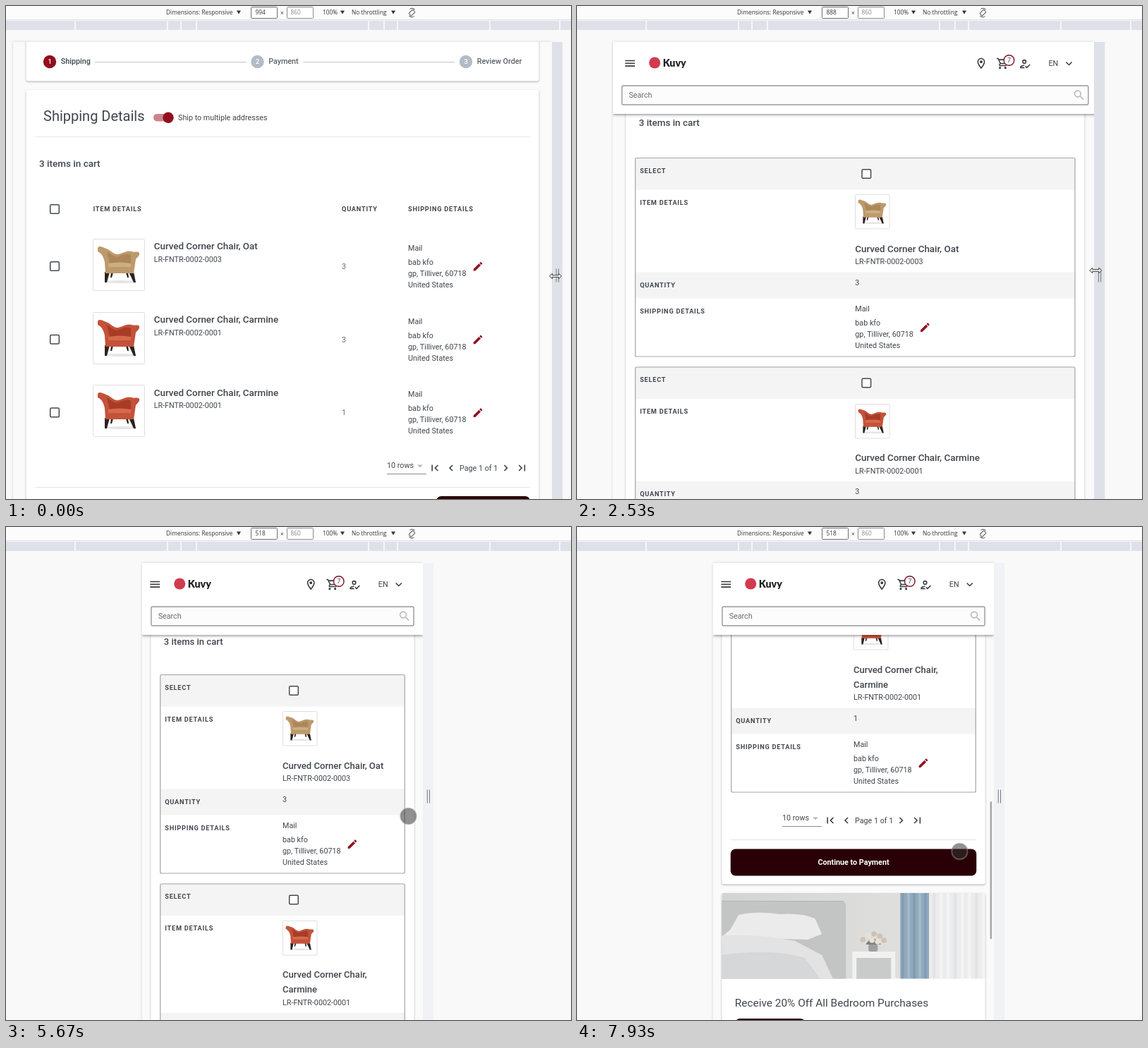
Recreate the animation shown at these times as an HTML page with a canvas. Size 801 by 699 pixels, loop 8000 ms.

```html
<!DOCTYPE html>
<html lang="en">
<head>
<meta charset="utf-8">
<title>Responsive checkout</title>
<style>
html, body { margin: 0; width: 100%; height: 100%; overflow: hidden; }
canvas { display: block; }
</style>
</head>
<body>
<canvas id="stage" width="801" height="699"></canvas>
<script>
const ctx = document.getElementById('stage').getContext('2d');
const LOOP = 8000, STEP = 1000 / 15, SCALE = 0.7686, CENTER = 392, TOP = 51, BOTTOM = 699;
const INK = '#40464d', RED = '#920f1f', DARK = '#290005';

// Timelines: flat lists of step, value
const WIDTH = [0, 994, 19, 994, 19.5, 991.4, 20, 991.4, 20.5, 986, 30, 933, 33, 933, 37.5, 894, 38, 888,
  38.5, 888, 46, 683, 46.5, 664, 47.5, 664, 53, 601, 54, 601, 59, 565, 67, 565, 67.5, 560, 68.5, 560,
  69, 554, 72, 554, 78, 518];
const SCROLL = [90, 0, 95, 100, 101, 231, 103, 262, 115, 690, 116, 690, 119, 750];
const CURSOR_DX = [0, 5, 1, 6, 19, 6, 20, 2, 47, 2, 68, 4.5];
const CURSOR_Y = [20, 383, 38, 375, 47, 368, 68, 362];
const TOUCH_X = [83, 580, 88, 556, 91, 540, 101, 540, 119, 542.5];
const TOUCH_Y = [83, 390, 88, 440, 91, 450, 101, 450, 119, 460];

const ICONS = {
  pencil: 'M3 17.25V21h3.75L17.81 9.94l-3.75-3.75zM20.71 7.04a1 1 0 0 0 0-1.41l-2.34-2.34a1 1 0 0 0-1.41 0l-1.83 1.83 3.75 3.75z',
  pin: 'M12 2C8.13 2 5 5.13 5 9c0 5.25 7 13 7 13s7-7.75 7-13c0-3.87-3.13-7-7-7zM7 9a5 5 0 0 1 10 0c0 2.88-2.88 7.19-5 9.88C9.92 16.21 7 11.85 7 9zM9.5 9a2.5 2.5 0 1 0 5 0a2.5 2.5 0 1 0-5 0z',
  cart: 'M15.55 13c.75 0 1.41-.41 1.75-1.03l3.58-6.49A1 1 0 0 0 20 4H5.21l-.94-2H1v2h2l3.6 7.59-1.35 2.44C4.52 15.37 5.48 17 7 17h12v-2H7l1.1-2zM6.16 6h12.15l-2.76 5H8.53zM5 20a2 2 0 1 0 4 0a2 2 0 1 0-4 0zM15 20a2 2 0 1 0 4 0a2 2 0 1 0-4 0z',
  user: 'M7 8a4 4 0 1 0 8 0a4 4 0 1 0-8 0zM9 8a2 2 0 1 1 4 0a2 2 0 1 1-4 0zM5 18c.2-.63 2.57-1.68 4.96-1.94l2.04-2C11.6 14 11.3 14 11 14c-2.67 0-8 1.34-8 4v2h9l-2-2zM20.6 12.5l-5.13 5.17-2.07-2.08L12 17l3.47 3.5L22 13.91z',
  search: 'M15.5 14h-.79l-.28-.27a6.5 6.5 0 1 0-.7.7l.27.28v.79l5 4.99L20.49 19zM9.5 14a4.5 4.5 0 1 1 0-9a4.5 4.5 0 0 1 0 9z',
  menu: 'M3 6h18v2H3zM3 11h18v2H3zM3 16h18v2H3z',
  down: 'M7.41 8.59L12 13.17l4.59-4.58L18 10l-6 6-6-6z',
  caret: 'M7 10h10l-5 5z',
  prev: 'M15.41 7.41L14 6l-6 6 6 6 1.41-1.41L10.83 12z',
  next: 'M8.59 16.59L10 18l6-6-6-6-1.41 1.41L13.17 12z',
  first: 'M18.41 16.59L13.82 12l4.59-4.59L17 6l-6 6 6 6zM6 6h2v12H6z',
  last: 'M5.59 7.41L10.18 12l-4.59 4.59L7 18l6-6-6-6zM16 6h2v12h-2z',
};
const CHAIR = {
  legs: 'M17 47h7l-4 15h-3zM51 47h7l3 15h-3zM26 48h3l-2 7h-2zM47 48h3l1 7h-2z',
  shell: 'M7 13C9 9 14 12 19 14C26 16 29 23 36 22C43 20 49 16 55 18C60 20 63 17 66 20C67 24 63 26 61 29L58 49H18L17 34C16 26 12 20 7 18z',
  back: 'M20 18C26 21 29 27 37 25C44 22 50 20 54 23L54 35H24z',
  seat: 'M22 35Q38 32 54 35V40H22z',
};
const TAN = ['#bd9a6b', '#ab875a', '#cdae82'], RUST = ['#c4523a', '#a83c26', '#d66a4a'];
const ITEMS = [
  { name: ['Curved Corner Chair,', 'Oat'], sku: 'LR-FNTR-0002-0003', qty: '3', tones: TAN },
  { name: ['Curved Corner Chair,', 'Carmine'], sku: 'LR-FNTR-0002-0001', qty: '3', tones: RUST },
  { name: ['Curved Corner Chair,', 'Carmine'], sku: 'LR-FNTR-0002-0001', qty: '1', tones: RUST },
];

function at(keys, k) {
  if (k <= keys[0]) return keys[1];
  for (let i = 2; i < keys.length; i += 2) {
    if (k <= keys[i]) {
      const f = (k - keys[i - 2]) / (keys[i] - keys[i - 2]);
      return keys[i - 1] + f * (keys[i + 1] - keys[i - 1]);
    }
  }
  return keys[keys.length - 1];
}

function rect(x, y, w, h, fill) {
  ctx.fillStyle = fill;
  ctx.fillRect(x, y, w, h);
}

function box(x, y, w, h, r, fill, stroke, line = 1) {
  ctx.beginPath();
  ctx.roundRect(x, y, w, h, r);
  if (fill) { ctx.fillStyle = fill; ctx.fill(); }
  if (stroke) { ctx.strokeStyle = stroke; ctx.lineWidth = line; ctx.stroke(); }
}

function circle(x, y, r, fill, stroke, line) {
  box(x - r, y - r, 2 * r, 2 * r, r, fill, stroke, line);
}

function shadowed(blur, dy, color, draw) {
  ctx.save();
  Object.assign(ctx, { shadowBlur: blur, shadowOffsetY: dy, shadowColor: color });
  draw();
  ctx.restore();
}

function paper(x, y, w, h) {
  shadowed(2.5, 1, 'rgba(0,0,0,.32)', () => box(x, y, w, h, 3, '#fff'));
}

// y is the middle of the capitals
function text(str, x, y, { size = 10.76, weight = 400, color = INK, gap = 0, align = 'left', font = 'Roboto' } = {}) {
  ctx.font = `${weight} ${size}px ${font}, sans-serif`;
  ctx.letterSpacing = gap + 'px';
  ctx.textAlign = align;
  ctx.fillStyle = color;
  ctx.fillText(str, x, Math.round(y + size * 0.355));
}

const label = (str, x, y) => text(str, x, y, { size: 9.22, weight: 700, gap: 0.75 });

function shape(path, x, y, scale, fill) {
  ctx.save();
  ctx.translate(x, y);
  ctx.scale(scale, scale);
  ctx.fillStyle = fill;
  ctx.fill(new Path2D(path), 'evenodd');
  ctx.restore();
}

function icon(name, x, y, color = '#363b40', scale = SCALE) {
  shape(ICONS[name], x - 12 * scale, y - 12 * scale, scale, color);
}

const checkbox = (x, y) => box(x - 6.3, y - 6.3, 12.6, 12.6, 1.5, '#fff', '#454a50', 1.5);

function thumbnail(x, y, size, [main, shade, light]) {
  box(x + 0.5, y + 0.5, size - 1, size - 1, 1, '#fff', '#dfdfdf');
  const s = size / 74;
  ctx.fillStyle = 'rgba(0,0,0,.1)';
  ctx.beginPath();
  ctx.ellipse(x + 40 * s, y + 61 * s, 23 * s, 2 * s, 0, 0, 7);
  ctx.fill();
  shape(CHAIR.legs, x, y, s, '#2c211d');
  shape(CHAIR.shell, x, y, s, main);
  shape(CHAIR.back, x, y, s, shade);
  shape(CHAIR.seat, x, y, s, light);
}

function address(x, y) {
  ['Mail', 'bab kfo', 'gp, Tilliver, 60718', 'United States'].forEach((line, i) =>
    text(line, x, y + [0, 20, 36, 52][i]));
  icon('pencil', x + 99, y + 26.3, RED, 0.7);
}

function pager(x, y) {
  text('10 rows', x, y);
  icon('caret', x + 47, y + 0.5, '#b5b5b5');
  rect(x, y + 11.5, 56, 1, '#8d8d8d');
  icon('first', x + 68, y + 3.5);
  icon('prev', x + 91, y + 3.5);
  text('Page 1 of 1', x + 103, y + 3.5);
  icon('next', x + 168.5, y + 3.5);
  icon('last', x + 191.5, y + 3.5);
}

function drawTools(viewWidth) {
  const ui = { size: 8.35, font: '"Open Sans"', color: '#333' };
  rect(0, 0, 801, 699, '#f9f9f9');
  rect(0, 0, 801, 20, '#fcfcfc');
  rect(0, 19, 801, 1, '#dcdcdc');
  text('Dimensions: Responsive', 227, 9.5, ui);
  text('100%', 449, 9.5, ui);
  text('No throttling', 490, 9.5, ui);
  for (const x of [330, 477, 549]) shape('M-3-2.5H3L0 2.5z', x, 9, 1, '#333');
  box(347.5, 1.5, 37, 16, 1, '#fff', '#6e6e6e');
  box(398.5, 1.5, 37, 16, 1, '#fff', '#8a8a8a');
  text(String(Math.round(viewWidth)), 353.5, 9.5, ui);
  text('×', 389, 10, ui);
  text('860', 403.5, 9.5, { ...ui, color: '#888' });
  ctx.save();
  ctx.translate(575.5, 9.5);
  ctx.rotate(Math.PI / 4);
  box(-2.5, -4, 5, 8, 1, null, '#555');
  for (const a of [-2.9, 0.25]) { ctx.beginPath(); ctx.arc(0, 0, 6, a, a + 1.3); ctx.stroke(); }
  ctx.restore();
  rect(0, 21, 801, 13, '#dee1e8');
  for (const d of [122, 144, 163, 294, 393]) {
    rect(CENTER - d - 0.7, 21, 1.4, 13, '#fff');
    rect(CENTER + d - 0.7, 21, 1.4, 13, '#fff');
  }
}

function drawWide(x, w) {
  const right = x + w, medium = { weight: 500 };
  paper(x + 18.5, 40, w - 37, 66.5);
  paper(x + 18.5, 119, w - 37, 620);
  [[x + 52, 'Shipping'], [CENTER - 35.5, 'Payment'], [right - 122, 'Review Order']].forEach(([cx, name], i) => {
    circle(cx, 79, 9.2, i ? '#b3bbc6' : RED);
    text(i + 1, cx, 79, { size: 9.2, weight: 500, color: '#fff', align: 'center' });
    text(name, cx + 15.7, 78.5, { ...medium, color: i ? '#5c636b' : INK });
  });
  rect(x + 116, 79, 341 - x - 116, 1, '#c3c7cc');
  rect(421, 79, right - 138 - 421, 1, '#c3c7cc');

  text('Shipping Details', x + 43, 156, { size: 20 });
  box(x + 199, 153, 26, 10.5, 5, '#cb858d');
  circle(x + 220, 158.2, 7.7, RED);
  text('Ship to multiple addresses', x + 234, 158.5);
  rect(x + 31, 185, w - 62, 1, '#e8e8e8');
  text('3 items in cart', x + 37, 223, { size: 13.5, weight: 500 });

  const qtyX = x + 0.61 * w, shipX = x + 0.733 * w;
  checkbox(x + 59, 288);
  label('ITEM DETAILS', x + 113.5, 288);
  label('QUANTITY', qtyX, 288);
  label('SHIPPING DETAILS', shipX, 288);
  ITEMS.forEach((item, i) => {
    const y = 330 + i * 103.7;
    checkbox(x + 59, y + 39);
    thumbnail(Math.floor(x + 113.6), Math.round(y), 74, item.tones);
    text(item.name.join(' '), x + 199.7, y + 10.5, { size: 13.4, weight: 500 });
    text(item.sku, x + 199.7, y + 29);
    text(item.qty, qtyX, y + 39, { color: '#6a6a6a' });
    address(shipX, y + 13);
  });
  pager(right - 234, 651.5);
  rect(x + 31, 682, w - 62, 1, '#e4e4e4');
  box(right - 164, 695, 133, 38, 7, DARK);
}

function drawItemCard(item, x, y, w, size, wrap) {
  const extra = wrap ? 21 : 0, col = x + w / 2, height = 282.5 + extra;
  box(x, y, w, height, 2, '#fff');
  rect(x, y, w, 45.5, '#f4f4f4');
  rect(x, y + 162.5 + extra, w, 37, '#f4f4f4');
  box(x + 0.5, y + 0.5, w - 1, height - 1, 2, null, '#a3a5a7', 1.2);
  label('SELECT', x + 7, y + 18.3);
  checkbox(col + 16, y + 23);
  label('ITEM DETAILS', x + 7, y + 63.7);
  thumbnail(Math.round(col), Math.round(y + 52), 49.5, item.tones);
  const lines = wrap ? item.name : [item.name.join(' ')];
  lines.forEach((line, i) => text(line, col, y + 129 + 21 * i, { size, weight: 500 }));
  text(item.sku, col, y + 147.6 + extra);
  label('QUANTITY', x + 7, y + 180.3 + extra);
  text(item.qty, col, y + 177 + extra);
  label('SHIPPING DETAILS', x + 7, y + 218 + extra);
  address(col, y + 214.4 + extra);
  return y + height;
}

function drawBedroom(x, y, w) {
  const h = 121.5;
  ctx.save();
  ctx.beginPath();
  ctx.roundRect(x, y, w, h, [3, 3, 0, 0]);
  ctx.clip();
  ctx.translate(x, y);
  const wall = ctx.createLinearGradient(0, 0, w, 0);
  wall.addColorStop(0, '#d3d3d2');
  wall.addColorStop(1, '#e4e4e3');
  rect(0, 0, w, h, wall);
  box(-5, 11, 181, 130, 6, '#c3c4c4');
  rect(0, 11, 172, 1, '#b3b4b4');
  shape('M0 62L12 52 24 31Q50 25 82 30Q112 28 132 36L142 58 122 66 60 64 0 68z', 0, 0, 1, '#ebebeb');
  shape('M0 60Q60 58 104 68L142 88 158 122H0z', 0, 0, 1, '#e3e3e4');
  shape('M0 88Q70 78 118 92L140 122H0z', 0, 0, 1, '#d6d7d8');
  box(185, 83, 61, 50, 1, '#f1f1f1');
  rect(191, 92, 49, 40, '#c9caca');
  box(208, 72, 13, 11, 3, '#9ca0a2');
  shape('M204 73Q214 56 226 73z', 0, 0, 1, '#7c8473');
  for (const [fx, fy] of [[200, 66], [207, 60], [216, 58], [224, 61], [230, 67], [213, 67], [221, 69]])
    circle(fx, fy, 3.8, fx % 2 ? '#e9e0d3' : '#cfc2b4');
  rect(253, 0, 41, h, '#91a9bd');
  for (let i = 0; i < 5; i++) rect(255 + i * 8, 0, 3.5, h, i % 2 ? '#a5bac9' : '#839cb1');
  rect(294, 0, w - 294, h, '#ececed');
  for (let i = 0; i < 8; i++) rect(299 + i * 10, 0, 4, h, i % 3 ? '#f4f4f5' : '#e2e3e5');
  ctx.restore();
}

function drawNarrow(x, layout, scroll) {
  const w = layout * SCALE, right = x + w, tablet = layout >= 600;
  const pad = tablet ? 18.4 : 12.3, size = tablet ? 13.4 : 13.05;
  const cardX = x + pad + 13, cardW = w - 2 * pad - 26, mid = x + w / 2;
  const top = (tablet ? 215 : 209) - Math.round(scroll);
  const wrap = layout < 535;
  const end = top + 3 * 282.5 + 28 + (wrap ? 42 : 0);

  paper(x + pad, -900, w - 2 * pad, end + 130 + 900);
  text('3 items in cart', x + pad + 18.6, top - (tablet ? 50 : 47), { size, weight: 500 });
  let y = top;
  ITEMS.forEach((item, i) => { y = drawItemCard(item, cardX, y, cardW, size, wrap && i > 0) + 14; });
  pager(mid - 101, end + 36);
  rect(cardX, end + 66.5, cardW, 1, '#e4e4e4');
  box(cardX - 0.5, end + 80, cardW + 1, 38, 7, DARK);
  text('Continue to Payment', mid, end + 99, { weight: 700, color: '#fff', align: 'center' });
  paper(x + pad, end + 142.5, w - 2 * pad, 300);
  drawBedroom(x + pad, end + 142.5, w - 2 * pad);
  text('Receive 20% Off All Bedroom Purchases', x + pad + 18.6, end + 298.5, { size: 15.4 });
  box(x + pad + 18.6, end + 320.5, 100, 30, 7, DARK);

  shadowed(4, 1, 'rgba(0,0,0,.5)', () => rect(x, TOP - 10, w, 112, '#fff'));
  icon('menu', x + pad + 6, 81.3);
  circle(x + pad + 41, 80.5, 8, '#d23a4f');
  text('Kuvy', x + pad + 52.5, 80.5, { size: 14.2, weight: 900, color: '#222', font: 'Lato' });
  const pin = right - pad - 146.5;
  icon('pin', pin, 81.5);
  icon('cart', pin + 30.5, 81.5);
  circle(pin + 39.5, 77, 7.3, '#fff', '#7d1420', 1.4);
  text('7', pin + 39.5, 77, { size: 9.2, align: 'center' });
  icon('user', pin + 62, 82);
  text('EN', pin + 95.5, 81.5);
  icon('down', pin + 124.5, 81.5);
  box(x + 13, 113, w - 26, 27, 2, '#fcfcfc', '#97999b', 1.4);
  text('Search', x + 22.7, 126.5, { color: '#6b6b6b' });
  icon('search', right - 26, 126.5, '#b9bbbd', 0.8);
}

function drawCursor(x, y) {
  const arrow = new Path2D('M-8.5 0L-4.5-3.7V-1.3H4.5V-3.7L8.5 0L4.5 3.7V1.3H-4.5V3.7z');
  ctx.save();
  ctx.translate(x, y);
  ctx.fillStyle = '#fff';
  ctx.strokeStyle = '#222';
  ctx.lineWidth = 0.9;
  ctx.fill(arrow);
  ctx.stroke(arrow);
  ctx.restore();
}

function draw(k) {
  // While dragging, the number runs ahead of the frame and the layout trails it
  const shown = at(WIDTH, k + 0.5), w = at(WIDTH, k) * SCALE, layout = at(WIDTH, k - 0.5);
  const x = CENTER - w / 2, right = x + w, scroll = at(SCROLL, k);
  drawTools(shown);
  shadowed(4, 0, 'rgba(0,0,0,.16)', () => rect(x, TOP, w, 700, '#fafafa'));

  ctx.save();
  ctx.beginPath();
  ctx.rect(x, TOP, w, BOTTOM - TOP);
  ctx.clip();
  if (layout >= 960) drawWide(x, layout * SCALE);
  else drawNarrow(x, layout, scroll);
  if (k >= 91) box(right - 5.5, 166.4 + scroll * 0.297, 2.6, 195, 1, '#a9a9a9');
  ctx.restore();

  const active = k < 42 || (k >= 73 && k < 83);
  rect(right, TOP, 15, BOTTOM - TOP, active ? '#dee1e8' : '#f0f2f5');
  rect(right + 5.7, 372.5, 1, 19, '#777');
  rect(right + 8.9, 372.5, 1, 19, '#777');
  if (k < 83) drawCursor(CENTER + shown * SCALE / 2 + at(CURSOR_DX, k), at(CURSOR_Y, k));
  else circle(at(TOUCH_X, k), at(TOUCH_Y, k), 11.2, 'rgba(50,50,50,.54)', 'rgba(140,140,140,.5)', 2);
}

function tick() {
  const t = performance.now() % LOOP;
  draw(Math.floor((t + 4) / STEP) % 120);
  requestAnimationFrame(tick);
}
tick();
</script>
</body>
</html>
```
